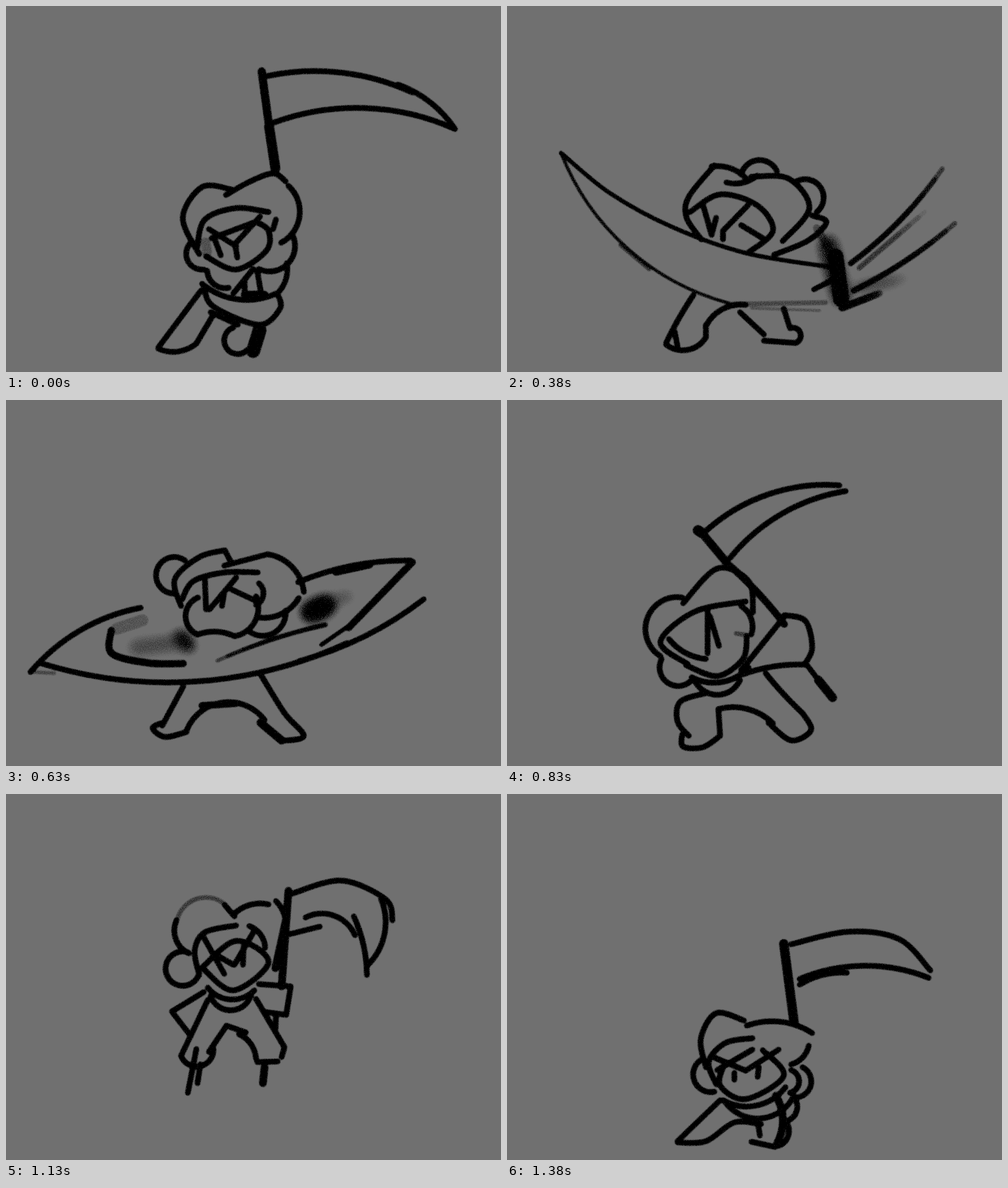
Recreate the animation shown at these times as an HTML page. Size 871 by 643 pixels, loop 1.43 s.

```html
<!DOCTYPE html>
<html lang="en">
<head>
<meta charset="utf-8">
<title>Scythe swing</title>
<style>
html, body { margin: 0; width: 100%; height: 100%; overflow: hidden; background: #707070; }
svg { display: block; width: 100vw; height: 100vh; }
path { fill: none; stroke: #000; stroke-linecap: round; stroke-linejoin: round; }
</style>
</head>
<body>
<svg viewBox="0 0 871 643">
  <defs>
    <!-- Charcoal: soft edges broken up by noise -->
    <filter id="ink" filterUnits="userSpaceOnUse" x="0" y="0" width="871" height="643" color-interpolation-filters="sRGB">
      <feTurbulence type="fractalNoise" baseFrequency=".7" numOctaves="2" seed="4"/>
      <feColorMatrix values="0 0 0 0 0  0 0 0 0 0  0 0 0 0 0  0 0 0 1 0" result="grain"/>
      <feGaussianBlur in="SourceGraphic" stdDeviation="1.7"/>
      <feComposite in2="grain" operator="arithmetic" k1="3.6" k2=".1" k3="0" k4="-.1"/>
    </filter>
    <filter id="smudge" filterUnits="userSpaceOnUse" x="0" y="0" width="871" height="643">
      <feGaussianBlur stdDeviation="9"/>
    </filter>
  </defs>
  <g id="drawing" filter="url(#ink)"></g>
</svg>
<script>
// Strokes are split by ";". Two points make a line, three a circular arc, more a smooth curve.
// Options: w = width, a = opacity, b = blurred, f = fades towards its end.
const poses = {
  rest: {
    scythe: `w13 450,115 463,212; w16 463,212 474,285; 460,123 590,117 715,152; 690,138 750,172 790,216;
      468,206 620,179 790,216`,
    figure: `387,332 430,308 470,294 492,308; 497,316 517,362 484,416; 396,322 345,318 311,372 340,436;
      326,415 320,448 348,463; 336,425 350,375 405,355 462,362; 475,375 470,392;
      357,392 405,422; 447,370 403,418; 403,418 407,442; 368,412 378,438; 362,408 440,379;
      352,440 405,463 458,430 462,395 440,379; 503,400 500,448 445,462; w18 a.2 351,415 354,432;
      354,465 364,487 392,495; 435,462 400,505; 345,488 405,515 478,504; w12 420,507 455,507;
      442,465 448,500; 420,480 420,508; 494,452 493,478 482,500; 348,492 365,528 445,560 482,532 479,508;
      343,500 268,600; 268,602 285,607 335,593; 335,593 365,542; 360,538 408,560;
      400,565 384,590 425,604; w23 446,570 435,606`
  },
  raise: {
    scythe: `301,280 325,150 402,58; w10 a.25 400,58 432,45; 443,33 390,150 370,290; w11 376,200 370,285;
      w19 295,296 370,303; w18 370,303 405,332`,
    figure: `392,358 445,325 487,342; 486,350 490,383 470,408; 400,353 345,347 300,395 337,447;
      332,440 345,405 400,380 465,386; 358,420 410,466; 413,457 425,403; 424,425 436,452; a.22 355,440 400,415 445,411;
      350,447 405,485 460,450 454,415; 345,455 305,460 315,492 375,485; 461,398 482,445 430,485;
      362,487 420,497 470,468; 470,468 487,488 482,512; a.3 482,512 474,530; 365,497 440,540; 440,540 470,535;
      358,500 263,605; 263,607 300,609 350,567 410,542; w11 408,545 418,568;
      w20 463,537 446,570; 412,576 395,600 455,602 447,577`
  },
  sweep: {
    scythe: `w6 95,258 180,328 290,388 420,434 565,458; w5 a.7 95,258 190,405 390,522; w8 a.35 200,420 250,462;
      w9 a.25 390,524 560,521; w6 a.2 430,531 550,535; w9 f 605,452 690,378 766,286; w10 a.3 f 620,460 735,362;
      w9 f 610,500 690,455 788,382; w20 a.25 b f 620,495 700,478; w32 a.6 b 565,420 588,510;
      w26 578,440 588,515; w14 a.25 545,390 565,425; w8 540,498 575,480; w12 f 590,530 655,505`,
    figure: `365,280 320,335 316,372 342,410; 360,282 390,284 420,302; 386,310 412,311 440,298; 412,296 440,271 475,290;
      430,300 495,303 532,355 485,413; 508,309 555,325 545,362; 537,368 562,380 530,412 470,437;
      322,362 375,331 440,350 468,395 425,433; 345,350 360,402; 368,372 360,402; 424,350 380,395; 380,395 380,410;
      412,385 450,408; 328,508 299,555 280,592; 280,595 300,604 350,582; 350,582 350,560; 350,562 380,532 420,525;
      410,538 452,577; 452,588 508,592; 508,592 517,578 498,566; 498,566 487,532; 295,572 300,598`
  },
  spin: {
    scythe: `237,365 130,405 43,478; 60,462 300,496 600,427; w7 a.25 50,478 85,480; 514,320 610,291 712,282;
      w10 580,303 640,290; w11 715,285 603,400; w6 610,392 555,430; 735,350 610,425 515,459;
      w7 f 562,395 470,420 372,458; w11 185,405 186,445 250,462 312,463; w22 a.18 195,402 240,387;
      w30 a.25 b 230,435 310,425; w22 a.6 b 308,415 322,432; w34 b 538,372 560,362; w24 a.2 b 570,355 600,345`,
    figure: `297,340 264,308 315,282; 308,362 297,315 340,276 385,264; 385,264 396,285; 384,291 460,271;
      460,271 505,295 524,337; 515,348 490,373 445,382; 310,350 330,318 385,303 443,303;
      338,347 316,378 337,412; 337,412 370,407 402,415; 402,415 440,385 440,345; 445,322 453,340 440,360;
      350,315 352,368; 405,312 358,368; 384,338 380,362; 397,333 440,353; 492,370 475,407 430,408;
      312,503 275,572; 272,568 258,577 280,592 318,583; 318,580 385,531 455,562; w11 345,537 405,533;
      w13 448,567 485,598; 485,599 524,590 490,550 448,482`
  },
  shoulder: {
    scythe: `350,230 465,164 585,150; 392,278 485,199 596,160; w13 340,230 385,284; w17 336,229 342,233;
      w11 385,285 435,332 488,394; w8 525,462 545,488; w14 548,492 573,523`,
    figure: `310,357 370,296 425,318 433,373; 308,347 247,383 270,450; 272,455 283,497 325,492;
      318,464 270,425 330,372 420,354; 315,466 370,485 415,455 422,415; a.3 422,413 403,410; 412,362 430,385 430,412;
      285,420 310,442 350,455; 353,370 353,445; 357,380 373,432; 325,487 375,496 425,470; 330,492 370,518 410,492;
      490,378 412,475; 488,378 525,388 537,435 525,463; 525,465 470,468 415,482; 455,480 485,515 520,550;
      520,550 535,580 500,598 460,567; 350,515 305,530 300,565 320,590; 308,588 310,609 345,610 375,590;
      375,590 372,543; 372,543 420,542 468,568`
  },
  leap: {
    scythe: `w12 497,170 485,338; 475,188 489,210 492,240; w12 494,215 474,306; 475,390 474,415;
      503,175 590,152 668,185 680,222; 660,185 668,225 637,300; 635,318 630,270 612,215;
      527,217 575,213 614,248; 500,246 552,233`,
    figure: `a.3 302,218 340,183 383,192; 385,195 402,215; 400,212 425,196 462,194; 300,222 300,258 322,280;
      320,278 281,310 340,315; 340,318 332,275 350,243 405,231; 428,232 450,250 456,270;
      345,305 405,258 462,295 400,345 345,305; 348,252 384,316; 365,280 400,300; 437,240 402,300; 418,268 417,300;
      355,340 395,361 437,345; 360,355 395,380 432,350; 348,348 292,382; 294,385 325,425;
      445,334 500,338; 501,338 493,388; 493,388 455,383; 355,362 308,460; 308,460 325,477 365,448;
      357,453 388,407; 388,407 422,419; 410,422 430,438 440,465; 442,471 478,470; 440,360 490,445; 490,445 485,462;
      335,448 320,525; 342,475 337,508; w12 455,480 452,508`
  },
  land: {
    scythe: `w15 487,263 505,400; 500,264 600,242 690,255 745,310; 515,325 620,302 742,323; 515,335 555,318 598,314`,
    figure: `350,480 341,430 368,385 417,398; 422,407 480,400 537,420; 531,442 521,462 500,475;
      340,468 330,505 365,523; 368,510 355,470 385,437 432,429; 370,485 432,449; 365,463 420,486; 420,486 478,449;
      382,475 375,512 420,536 487,495 450,450; 400,490 400,502; 443,480 441,497;
      500,485 514,505 498,525; 520,480 535,510 505,533; 380,538 435,548 490,515; 383,540 420,567 505,530;
      375,538 300,610; 300,612 350,610 400,577 447,580; 442,582 445,600; 430,611 472,620;
      w12 473,530 485,565 475,614; 490,575 495,600 478,618; 505,533 510,556 490,575`
  }
};

// [start ms, figure, figure transform, scythe, scythe transform]; the scythe follows the figure unless given
const timeline = [
  [0, 'rest'],
  [80, 'rest', 'translate(-6 8)', 'rest', 'rotate(-40 470 290)'],
  [170, 'raise'],
  [290, 'raise', 'translate(12 -6)', 'rest', 'translate(470 300) rotate(38) scale(1.25) translate(-470 -290)'],
  [380, 'sweep'],
  [420, 'sweep', 'translate(-6 0)', 'sweep', 'translate(-72 0)'],
  [500, 'spin', 'translate(8 0)', 'spin', 'translate(780 0) scale(-1 1)'],
  [580, 'spin', 'translate(4 0)', 'spin', 'rotate(-5 390 400)'],
  [630, 'spin'],
  [710, 'spin', 'translate(-5 2)', 'sweep', 'translate(5 0)'],
  [770, 'shoulder', 'translate(12 0)', 'shoulder', 'rotate(30 435 350)'],
  [830, 'shoulder'],
  [960, 'shoulder', 'translate(0 6)'],
  [1045, 'leap', 'translate(-4 45)'],
  [1130, 'leap'],
  [1210, 'leap', 'translate(8 40)'],
  [1295, 'land', 'translate(0 8)'],
  [1380, 'land']
];
const LOOP = 1430;

function arc(a, b, c) {
  const [ux, uy, vx, vy] = [a[0] - b[0], a[1] - b[1], c[0] - b[0], c[1] - b[1]];
  const cross = vx * uy - vy * ux;
  const chord = Math.hypot(c[0] - a[0], c[1] - a[1]);
  const radius = Math.min(1e5, Math.hypot(ux, uy) * Math.hypot(vx, vy) * chord / Math.abs(2 * cross));
  const large = ux * vx + uy * vy > 0 ? 1 : 0;
  return `M${a}A${radius} ${radius} 0 ${large} ${cross > 0 ? 1 : 0} ${c}`;
}

function spline(points) {
  const at = i => points[Math.max(0, Math.min(points.length - 1, i))];
  let d = `M${points[0]}`;
  for (let i = 0; i < points.length - 1; i++) {
    const [a, b, c, e] = [at(i - 1), at(i), at(i + 1), at(i + 2)];
    const c1 = b.map((v, k) => v + (c[k] - a[k]) / 6);
    const c2 = c.map((v, k) => v - (e[k] - b[k]) / 6);
    d += `C${c1} ${c2} ${c}`;
  }
  return d;
}

function strokePath(text) {
  const points = [];
  const options = { w: 8.5, a: 1 };
  for (const token of text.trim().split(/\s+/)) {
    if (/[a-z]/.test(token)) options[token[0]] = +token.slice(1) || true;
    else points.push(token.split(',').map(Number));
  }
  const d = points.length === 3 ? arc(...points) : spline(points);
  const filter = options.b ? 'filter="url(#smudge)"' : '';
  const lengths = options.f ? [.6, .75, .9, 1] : [1];
  const opacity = options.a / lengths.length ** .8;
  return lengths.map(part => `<path d="${d}" stroke-width="${options.w}" opacity="${opacity}" ${filter}
    ${options.f ? `pathLength="1" stroke-dasharray="${part} 2"` : ''}/>`).join('');
}

const group = (strokes, transform) =>
  `<g transform="${transform}">${strokes.split(';').map(strokePath).join('')}</g>`;

const drawings = timeline.map(([, figure, move = '', scythe = figure, swing = move]) =>
  group(poses[scythe].scythe, swing) + group(poses[figure].figure, move));

const drawing = document.getElementById('drawing');
const begin = performance.now();
let shown = -1;

function render() {
  const t = (performance.now() - begin) % LOOP;
  const index = timeline.findLastIndex(([start]) => start <= t);
  if (index !== shown) drawing.innerHTML = drawings[shown = index];
  requestAnimationFrame(render);
}
render();
</script>
</body>
</html>
```
